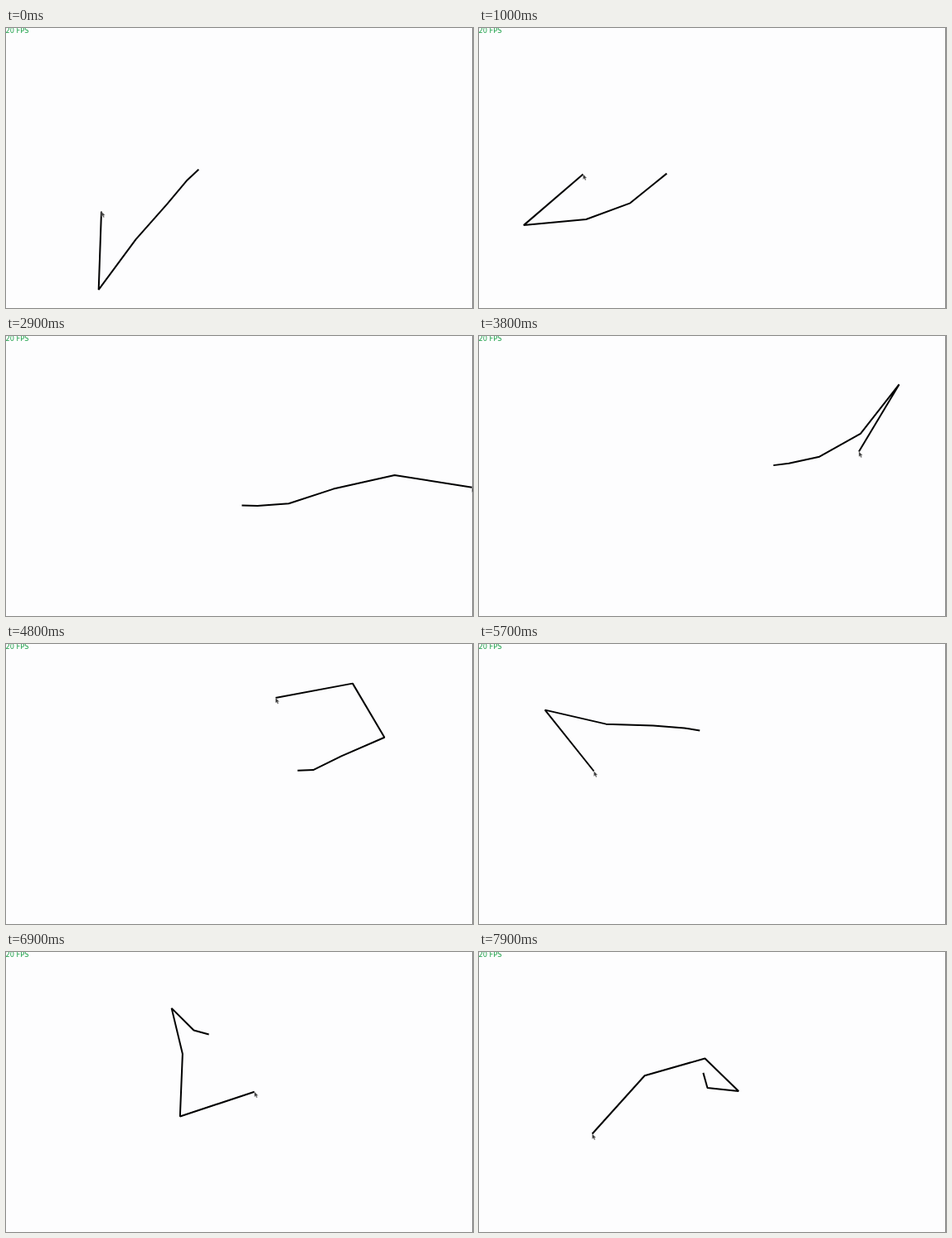
Animation, 563 px wide and 338 px high, one loop 8 s. Source, as an HTML page:

```html
<!DOCTYPE html>
<html lang="en">
<head>
<meta charset="utf-8">
<title>Chain following a pointer</title>
<style>
  html, body { margin: 0; width: 100%; height: 100%; overflow: hidden; background: #fdfdfe; }
  svg { display: block; width: 563px; height: 338px; }
  text { font: 8.2px "DejaVu Sans", sans-serif; fill: #189e45; }
</style>
</head>
<body>
<svg viewBox="0 0 563 338">
  <text x="-0.5" y="6.4">20 FPS</text>
  <path d="M562.5 0V338" stroke="#858585"/>
  <polyline id="chain" fill="none" stroke="#000" stroke-width="2" stroke-linejoin="bevel"/>
  <path id="pointer" d="M0 0V6L1.4 4.9L2.5 7.2L3.5 6.7L2.5 4.5H4.3Z" fill="#3c3c3c" stroke="#aaa" stroke-width=".4"/>
</svg>
<script>
const STEP = 100, COUNT = 80, SUBSTEPS = 16;
const LENGTHS = [5, 4, 3, 2, 1].map(n => n * 18.9);

// Key poses: step, pointer, chain angles in degrees; "via" lists [step, x, y] on the way to the next
const KEYS = [
  { at: 0, head: [115, 221.5], pose: [92, -53.6, -48.5, -50, -43],
    via: [[1, 115, 221.5], [3, 118, 148], [5, 124, 77], [7, 150, 109]] },
  { at: 10, head: [125.5, 176.5], pose: [139.3, -5.4, -20.3, -39, -39],
    via: [[13, 108, 234], [16, 240, 203]] },
  { at: 20, head: [444.5, 135.5], pose: [172.7, 153, 194.5, -64.5, 99],
    via: [[28, 557, 160], [34, 551, 335], [35, 551, 335]] },
  { at: 38, head: [458, 139.5], pose: [-59.1, 128, 150.8, 167.5, 173],
    via: [[40, 490, 108], [44, 549, 106], [48, 325, 65], [51, 75, 48], [53, 40, 156]] },
  { at: 57, head: [138.5, 153.5], pose: [-128.6, 13, 1.8, 4.6, 9],
    via: [[60, 215, 36], [62, 315, 165], [65, 135, 255], [67, 225, 264]] },
  { at: 69, head: [299.5, 168.7], pose: [161.6, -87.7, -103.5, 45, 15],
    via: [[72, 490, 158], [75, 385, 168], [77, 230, 145]] },
  { at: 79, head: [136.5, 219.5], pose: [-48, -16, 44.3, 186, -105.5], via: [] }
];
const PATH = KEYS.flatMap(({ at, head, via }) => [[at, ...head], ...via]);

const radians = deg => deg * Math.PI / 180;
const wrap = a => Math.atan2(Math.sin(a), Math.cos(a));
const distance = (a, b) => Math.hypot(b[0] - a[0], b[1] - a[1]);

// Path slope at a point; zero where the pointer rests
function slope(i, axis) {
  const a = PATH[Math.max(i - 1, 0)], p = PATH[i], b = PATH[Math.min(i + 1, PATH.length - 1)];
  if (a[axis] === p[axis] || b[axis] === p[axis]) return 0;
  return (b[axis] - a[axis]) / (b[0] - a[0]);
}

// Cubic Hermite curve through the path points
function headAt(step) {
  let i = 0;
  while (i < PATH.length - 2 && PATH[i + 1][0] <= step) i++;
  const a = PATH[i], b = PATH[i + 1], span = b[0] - a[0], u = (step - a[0]) / span;
  return [1, 2].map(k =>
    a[k] + (b[k] - a[k]) * u * u * (3 - 2 * u) +
    span * u * (1 - u) * (slope(i, k) * (1 - u) - slope(i + 1, k) * u));
}

function joints(head, angles) {
  const points = [head];
  angles.forEach((a, i) => {
    const [x, y] = points[i];
    points.push([x + LENGTHS[i] * Math.cos(a), y + LENGTHS[i] * Math.sin(a)]);
  });
  return points;
}

// Each joint is towed or pushed by the one before it
function follow(from, to, angles) {
  const old = joints(from, angles);
  let [x, y] = to;
  return angles.map((_, i) => {
    const a = Math.atan2(old[i + 1][1] - y, old[i + 1][0] - x);
    x += LENGTHS[i] * Math.cos(a);
    y += LENGTHS[i] * Math.sin(a);
    return a;
  });
}

// Simulate from one key to the next, spreading the drift over the distance travelled
function simulate(start, end) {
  let angles = start.pose.map(radians), head = headAt(start.at), travelled = 0;
  const run = [{ head, angles, travelled }];
  for (let n = 1; n <= (end.at - start.at) * SUBSTEPS; n++) {
    const next = headAt(start.at + n / SUBSTEPS);
    angles = follow(head, next, angles);
    travelled += distance(head, next);
    head = next;
    if (n % SUBSTEPS === 0) run.push({ head, angles, travelled });
  }
  const drift = end.pose.map((deg, i) => wrap(radians(deg) - angles[i]));
  return run.map(r => joints(r.head, r.angles.map((a, i) => a + drift[i] * r.travelled / travelled)));
}

const frames = [];
KEYS.slice(1).forEach((end, i) => {
  simulate(KEYS[i], end).forEach((points, n) => { frames[KEYS[i].at + n] = points; });
});

const chain = document.getElementById("chain");
const pointer = document.getElementById("pointer");
const began = performance.now();

function draw() {
  const time = Math.max(0, performance.now() - began);
  const points = frames[Math.floor(time / STEP) % COUNT];
  chain.setAttribute("points", points.map(p => p.map(v => v.toFixed(2)).join()).join(" "));
  pointer.setAttribute("transform", `translate(${points[0].map(v => v.toFixed(2))})`);
  requestAnimationFrame(draw);
}
draw();
</script>
</body>
</html>
```
